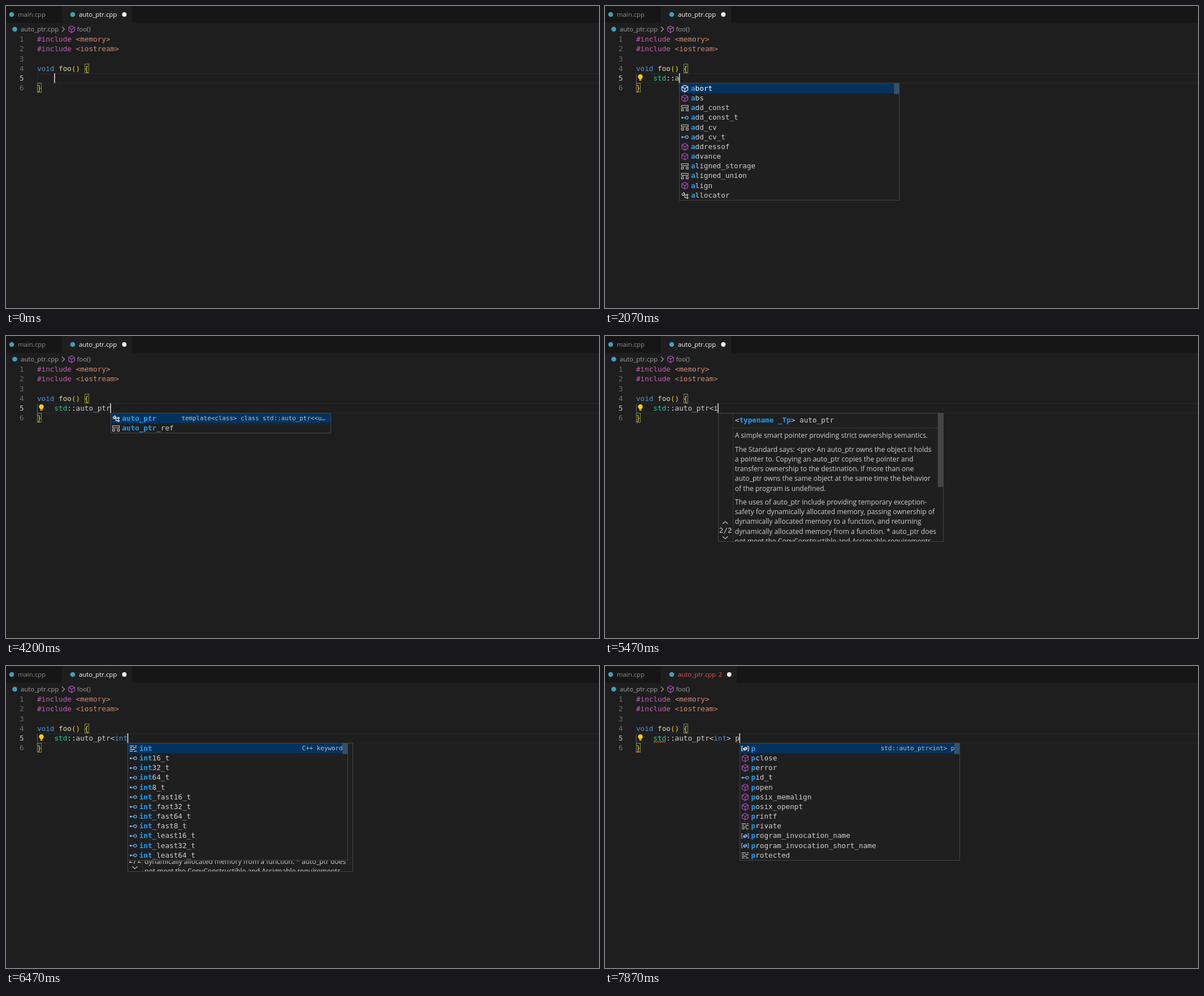
An HTML page with a canvas that plays this animation: 1049x534 px, repeating every 8000 ms.

```html
<!DOCTYPE html>
<html lang="en">
<head>
<meta charset="utf-8">
<title>Code editor typing</title>
<style>
html, body { margin: 0; width: 100%; height: 100%; overflow: hidden; background: #1e1e1e; }
canvas { display: block; width: 100vw; height: 100vh; }
</style>
</head>
<body>
<canvas id="stage"></canvas>
<script>
const W = 1049, H = 534, LOOP = 8000;
const LINE = 17.17, CHAR = 7.62, LEFT = 55, POP_TOP = 137;
const MONO = '"DejaVu Sans Mono", monospace', SANS = '"Open Sans", "Noto Sans", sans-serif';
const CODE = '12.66px ' + MONO, BOLD = 'bold ' + CODE, SMALL = '10.85px ' + MONO;
const UI = '11.35px ' + SANS, DOC = '12.1px ' + SANS;
const C = {
  bg: '#1e1e1e', popup: '#1f1f20', border: '#454545', select: '#03335d', text: '#d0d0d0',
  macro: '#c65fb4', string: '#d08a70', keyword: '#4d93cf', func: '#dcdcaa', space: '#27cf98',
  gold: '#f5d21e', blue: '#1a9ff2', purple: '#b44fc8', icon: '#75beff', file: '#3fa0b8',
  red: '#e5504a', thumb: 'rgba(121,121,121,.42)'
};

const canvas = document.getElementById('stage');
const ctx = canvas.getContext('2d');

// [time, key]
const KEYS = [
  [530, 's'], [670, 't'], [800, 'd'], [1330, ':'], [1470, ':'],
  [1930, 'a'], [2130, 'u'], [2400, 't'], [2600, 'o'], [3070, '_'],
  [3530, 'p'], [3930, 't'], [4200, 'r'], [5000, '<'], [5470, 'i'],
  [5800, 'n'], [6200, 't'], [6670, '>'], [7070, ' '], [7600, 'p']
];

const AUTO = 'template<class> class std::auto_ptr<<u…';
const list = s => s.split(' ').map(e => e.split('|'));
const autoPtr = list('C|auto_ptr s|auto_ptr_ref');
const members = list('m|abort m|abs s|add_const i|add_const_t s|add_cv i|add_cv_t m|addressof m|advance s|aligned_storage s|aligned_union m|align C|allocator');

// Completion lists; entries are kind|label|letters to mark
const LISTS = [
  { from: 600, to: 670, query: 's', detail: 'C++ keyword',
    items: list('k|short k|signed k|sizeof k|static k|static_assert k|static_cast k|struct k|switch m|scanf m|setbuf m|sprintf m|sscanf') },
  { from: 670, to: 800, query: 'st', detail: 'C++ keyword',
    items: list('k|static k|static_assert k|static_cast k|struct n|std v|stderr v|stdin v|stdout m|strcat m|strchr m|strcmp m|strcpy') },
  { from: 800, to: 1330, query: 'std', detail: 'namespace std',
    items: list('n|std v|stderr v|stdin v|stdout c|STA_DEL m|strtod m|strtod_l m|strtold m|strtold_l m|strfromd c|STA_MODE c|_STD_NEW_ALLOCATOR_H') },
  { from: 1530, to: 1930, query: '', detail: '', items: members },
  { from: 1930, to: 2130, query: 'a', detail: '', items: members },
  { from: 2130, to: 2400, query: 'au', detail: AUTO,
    items: list('C|auto_ptr s|auto_ptr_ref s|aligned_union i|aligned_union_t') },
  { from: 2400, to: 2600, query: 'aut', detail: AUTO,
    items: list('C|auto_ptr s|auto_ptr_ref i|aligned_union_t') },
  { from: 2600, to: 3070, query: 'auto', detail: AUTO,
    items: list('C|auto_ptr s|auto_ptr_ref i|aligned_union_t|auot') },
  { from: 3070, to: 3530, query: 'auto_', detail: AUTO, items: autoPtr },
  { from: 3530, to: 3930, query: 'auto_p', detail: AUTO, items: autoPtr },
  { from: 3930, to: 4200, query: 'auto_pt', detail: AUTO, items: autoPtr },
  { from: 4200, to: 5000, query: 'auto_ptr', detail: AUTO, items: autoPtr },
  { from: 5600, to: 5800, query: 'i', detail: 'C++ keyword',
    items: list('k|if k|inline k|int i|int16_t i|int32_t i|int64_t i|int8_t m|isalnum m|isalpha m|iscntrl m|isdigit m|isgraph') },
  { from: 5800, to: 6200, query: 'in', detail: 'C++ keyword',
    items: list('k|inline k|int i|int16_t i|int32_t i|int64_t i|int8_t i|int_fast16_t i|int_fast32_t i|int_fast64_t i|int_fast8_t i|int_least16_t i|int_least32_t') },
  { from: 6200, to: 6670, query: 'int', detail: 'C++ keyword',
    items: list('k|int i|int16_t i|int32_t i|int64_t i|int8_t i|int_fast16_t i|int_fast32_t i|int_fast64_t i|int_fast8_t i|int_least16_t i|int_least32_t i|int_least64_t') },
  { from: 7670, to: LOOP, query: 'p', detail: 'std::auto_ptr<int> p',
    items: list('v|p m|pclose m|perror i|pid_t m|popen m|posix_memalign m|posix_openpt m|printf k|private v|program_invocation_name v|program_invocation_short_name k|protected') }
];

const HELP = { from: 5270, barUntil: 5600, to: 6870 };
const ERRORS_AT = 7270, BULB_AT = 870;
const DOCS = [
  ['A simple smart pointer providing strict ownership semantics.'],
  ['The Standard says: <pre> An auto_ptr owns the object it holds',
   'a pointer to. Copying an auto_ptr copies the pointer and',
   'transfers ownership to the destination. If more than one',
   'auto_ptr owns the same object at the same time the behavior',
   'of the program is undefined.'],
  ['The uses of auto_ptr include providing temporary exception-',
   'safety for dynamically allocated memory, passing ownership of',
   'dynamically allocated memory to a function, and returning',
   'dynamically allocated memory from a function. * auto_ptr does',
   'not meet the CopyConstructible and Assignable requirements']
];

const colX = col => LEFT + CHAR * col;
const lineY = n => 58.9 + LINE * (n - 1);

function rect(x, y, w, h, color) {
  ctx.fillStyle = color;
  ctx.fillRect(x, y, w, h);
}

function frame(x, y, w, h, color) {
  ctx.strokeStyle = color;
  ctx.lineWidth = 1;
  ctx.strokeRect(x + .5, y + .5, w - 1, h - 1);
}

function disc(x, y, r, color) {
  ctx.fillStyle = color;
  ctx.beginPath();
  ctx.arc(x, y, r, 0, 7);
  ctx.fill();
}

function stroke(color, width, ...paths) {
  ctx.strokeStyle = color;
  ctx.lineWidth = width;
  ctx.beginPath();
  for (const p of paths)
    for (let i = 0; i < p.length; i += 2) ctx[i ? 'lineTo' : 'moveTo'](p[i], p[i + 1]);
  ctx.stroke();
}

// y is the middle of the line box
function text(s, x, y, color, font = CODE, align = 'left') {
  ctx.font = font;
  ctx.textAlign = align;
  ctx.fillStyle = color;
  ctx.fillText(s, x, y + (font === SMALL ? 3.8 : 4.4));
}

// Monospaced runs of [string, colour, font]
function runs(x, y, parts) {
  for (const [s, color, font] of parts) {
    text(s, x, y, color, font);
    x += s.length * CHAR;
  }
}

const ICONS = {
  m(c) {
    stroke(c, 1.1, [0, -6, 5.3, -3.2, 5.3, 3, 0, 6, -5.3, 3, -5.3, -3.2, 0, -6],
      [-5.3, -3.2, 0, 0, 5.3, -3.2], [0, 0, 0, 6]);
  },
  v(c) {
    stroke(c, 1.1, [-4, -4, -6, -4, -6, 4, -4, 4], [4, -4, 6, -4, 6, 4, 4, 4],
      [-3, 0, 1, -2.6, 3.2, -1.2, 3.2, .8, -1, 3, -3, 1.6, -3, 0, -1, 1, 3.2, -1.2], [-1, 1, -1, 3]);
  },
  c(c) {
    ctx.strokeStyle = c;
    ctx.lineWidth = 1.1;
    ctx.strokeRect(-6, -4, 12, 8.5);
    stroke(c, 1.1, [-3.5, -1.2, 3.5, -1.2], [-3.5, 1.7, 3.5, 1.7]);
  },
  k(c) {
    stroke(c, 1.2, [-6, -4.5, 1, -4.5], [3, -4.5, 6, -4.5], [-6, -1.5, -2, -1.5], [0, -1.5, 6, -1.5],
      [-6, 1.5, 3, 1.5], [-6, 4.5, -1, 4.5], [1, 4.5, 6, 4.5]);
  },
  i(c) {
    disc(-4.5, 0, 1.7, c);
    stroke(c, 1.1, [-4, 0, 1, 0]);
    ctx.beginPath();
    ctx.arc(3.5, 0, 2.5, 0, 7);
    ctx.stroke();
  },
  s(c) {
    ctx.strokeStyle = c;
    ctx.lineWidth = 1.1;
    ctx.strokeRect(-6, -4.5, 12, 3.5);
    ctx.strokeRect(-6, 1.5, 3.5, 3.5);
    ctx.strokeRect(2.5, 1.5, 3.5, 3.5);
  },
  C(c) {
    stroke(c, 1.2, [-5.5, -1.5, -2, -5, 0, -3, -3.5, .5, -5.5, -1.5], [-2, -.8, 3, -.8], [0, -.8, 0, 4, 3, 4],
      [3, -.8, 4.5, -2.3, 6, -.8, 4.5, .7, 3, -.8], [3, 4, 4.5, 2.5, 6, 4, 4.5, 5.5, 3, 4]);
  },
  n(c) { text('{}', 0, 0, c, SMALL, 'center'); }
};

function icon(kind, x, y, color) {
  ctx.save();
  ctx.translate(x, y);
  ICONS[kind](color);
  ctx.restore();
}

const kindColor = k => k === 'm' ? C.purple : 'vi'.includes(k) ? C.icon : '#c5c5c5';

function marked(label, query, color) {
  let q = 0;
  return [...label].map(ch => {
    const hit = q < query.length && ch.toLowerCase() === query[q];
    if (hit) q++;
    return hit ? [ch, C.blue, BOLD] : [ch, color, CODE];
  });
}

function drawList({ items, query, detail }, x) {
  const w = 389.5, h = items.length * LINE + 2;
  rect(x, POP_TOP - .5, w, h, C.popup);
  rect(x, POP_TOP, w, LINE, C.select);
  items.forEach(([kind, label, mark], i) => {
    const y = 145.5 + LINE * i;
    icon(kind, x + 10, y + .5, i ? kindColor(kind) : '#fff');
    runs(x + 20.7, y, marked(label, mark || query, i ? C.text : '#fff'));
  });
  text(detail, x + w - 9, 145.5, '#b4c0cc', SMALL, 'right');
  if (items.length === 12) rect(x + w - 9.5, POP_TOP, 9, 19, C.thumb);
  frame(Math.round(x), 136, 390, Math.round(h), C.border);
}

function drawHelp(x, showBar) {
  const left = Math.round(x), w = 399, bottom = 364;
  ctx.save();
  ctx.beginPath();
  ctx.rect(left, 136, w, bottom - 136);
  ctx.clip();
  rect(left, 136, w, bottom - 136, C.popup);
  rect(left + 26, 137, 1, 227, '#363636');
  rect(left + 26, 162, 363, 1, '#363636');
  runs(x + 30, 149, [['<', C.text], ['typename _Tp', C.blue, BOLD], ['> auto_ptr', C.text]]);
  let y = 176;
  for (const para of DOCS) {
    for (const s of para) {
      text(s, x + 30, y, C.text, DOC);
      y += LINE;
    }
    y += 7.3;
  }
  text('2/2', x + 2, 343.5, C.text);
  const mid = x + 13;
  stroke('#c5c5c5', 1.1, [mid - 4.5, 332, mid, 328, mid + 4.5, 332], [mid - 4.5, 354.5, mid, 358.5, mid + 4.5, 354.5]);
  if (showBar) rect(x + 389, POP_TOP, 9.5, 130, C.thumb);
  frame(left, 136, w, bottom - 136, C.border);
  ctx.restore();
}

function squiggle(x, w, y) {
  const p = [];
  for (let d = 0; d <= w; d += 1.8) p.push(x + d, y + (p.length / 2 % 2 ? 1 : -1));
  stroke(C.red, 1.1, p);
}

function drawHeader(errors) {
  const right = errors ? 233 : 223;
  rect(0, 0, W, 30, '#161616');
  rect(100, 0, right - 100, 30, C.bg);
  rect(99, 0, 1, 30, C.bg);
  disc(10, 15, 4.3, C.file);
  text('main.cpp', 21, 15, '#8e8e8e', UI);
  disc(118, 15, 4.3, C.file);
  text('auto_ptr.cpp', 129, 15, errors ? C.red : '#fff', UI);
  if (errors) text('2', 201, 15, C.red, UI);
  disc(errors ? 219.8 : 209.3, 15, 3.9, '#fff');

  disc(15.5, 41, 4.3, C.file);
  text('auto_ptr.cpp', 26, 40.5, '#a0a0a0', UI);
  stroke('#a0a0a0', 1.1, [99, 36.5, 103.5, 41, 99, 45.5]);
  icon('m', 116, 41, C.purple);
  text('foo()', 125.5, 40.5, '#a0a0a0', UI);
}

function matchBox(col, line) {
  const x = Math.round(colX(col)), y = Math.round(lineY(line) - 8.5);
  rect(x, y, 8, 17, 'rgba(0,100,0,.1)');
  frame(x, y, 8, 17, '#85855c');
}

function typedRuns(s) {
  if (s.length < 5) return [[s, C.text]];
  const [, name, open, arg, rest] = s.slice(5).match(/^(\w*)(<?)(\w*)(.*)$/);
  return [['std', C.space], ['::', C.text], [name, name === 'auto' ? C.keyword : C.text],
    [open, C.text], [arg, arg === 'int' ? C.keyword : C.text], [rest, C.text]];
}

function drawBulb() {
  disc(62.5, 125, 4.2, '#ffd000');
  rect(60.7, 128, 3.6, 4, '#ffd000');
  rect(60.7, 129.8, 3.6, .7, C.bg);
}

function drawCode(typed, t) {
  rect(LEFT, 119, W - LEFT, 1, '#292929');
  rect(LEFT, 135.5, W - LEFT, 1, '#292929');
  rect(LEFT, 120, 1, 16, typed ? '#606060' : '#303030');
  for (let n = 1; n <= 6; n++) text(n, 31.5, lineY(n), n === 5 ? '#c6c6c6' : '#707070', CODE, 'right');
  matchBox(11, 4);
  matchBox(0, 6);
  ['<memory>', '<iostream>'].forEach((s, i) =>
    runs(LEFT, lineY(i + 1), [['#include ', C.macro], [s, C.string]]));
  runs(LEFT, lineY(4), [['void ', C.keyword], ['foo', C.func], ['() {', C.gold]]);
  runs(colX(4), lineY(5), typedRuns(typed));
  text('}', LEFT, lineY(6), C.gold);
  if (t >= ERRORS_AT) {
    squiggle(colX(4), 23, 134);
    squiggle(LEFT, 8, 151.5);
  }
  if (t >= BULB_AT) drawBulb();
}

function draw(t) {
  const pressed = KEYS.filter(k => k[0] <= t);
  const typed = pressed.map(k => k[1]).join('');
  const last = pressed.length ? pressed[pressed.length - 1][0] : -170;
  const x = colX(4 + typed.length);

  rect(0, 0, W, H, C.bg);
  drawHeader(t >= ERRORS_AT);
  drawCode(typed, t);
  if ((t - last) % 1000 < 500) rect(x - .4, 119, 1.6, 17.2, '#d4d4d4');
  if (t >= HELP.from && t < HELP.to) drawHelp(x, t < HELP.barUntil);
  const open = LISTS.find(l => t >= l.from && t < l.to);
  if (open) drawList(open, x);
}

function resize() {
  const dpr = window.devicePixelRatio || 1;
  canvas.width = Math.round(innerWidth * dpr);
  canvas.height = Math.round(innerHeight * dpr);
}

let start;
function tick(now) {
  start ??= now;
  ctx.setTransform(canvas.width / W, 0, 0, canvas.height / H, 0, 0);
  draw((now - start) % LOOP);
  requestAnimationFrame(tick);
}

addEventListener('resize', resize);
resize();
requestAnimationFrame(tick);
</script>
</body>
</html>
```
